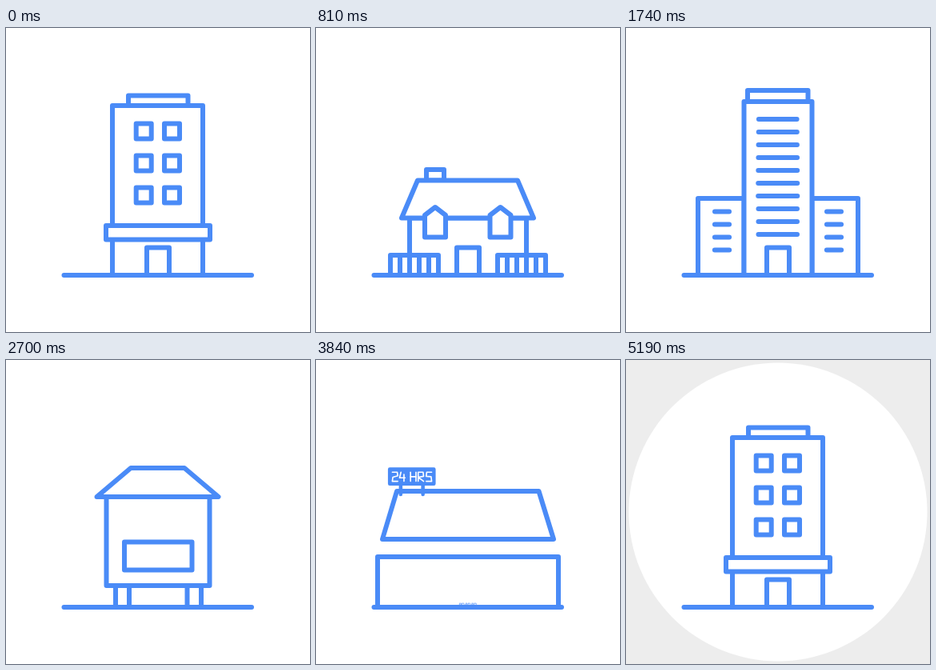
Animation of 380 by 380 pixels, one loop 5.49 s. Source, as an HTML page with a canvas:

```html
<!DOCTYPE html>
<html lang="en">
<head>
<meta charset="utf-8">
<title>Buildings</title>
<style>
  html, body { margin: 0; width: 100%; height: 100%; overflow: hidden; background: #fff; }
  canvas { display: block; width: 100vmin; height: 100vmin; }
</style>
</head>
<body>
<canvas id="stage" width="380" height="380" role="img" aria-label="Buildings changing shape, one with a sign reading 24 HRS"></canvas>
<script>
const ctx = document.getElementById('stage').getContext('2d');
const BLUE = '#4a8bf7', LOOP = 5490, LAST = 5190, STEP = 30;
const MID = 190, GROUND = 309;
const LEFT_RIGHT = [-1, 1];

// ---- timing ----
const clamp = x => Math.max(0, Math.min(1, x));
const ring = (x, period, decay) => Math.exp(-x / decay) * Math.cos(2 * Math.PI * x / period);

function spring(t, start, period, decay) {
  const x = t - start;
  if (x <= 0) return 0;
  return x > 500 ? 1 : 1 - ring(x, period, decay);
}

// Swells a little, then shrinks to nothing.
function leave(t, start, length) {
  const x = clamp((t - start) / length);
  return 1 - x * x * (2.2 * x - 1.2);
}

const frameLife = (t, a, b, decay = 60) => spring(t, a, 400, decay) * leave(t, b, 150);
const detailLife = (t, a, b) => spring(t, a, 360, 120) * leave(t, b, 160);

function bump(t, a, b) {
  return Math.sin(Math.PI * clamp((t - a) / (b - a))) ** 2;
}

// ---- drawing ----
let view;

// Points drawn inside are scaled around (x, y); line weight is kept apart.
function part(x, y, sx, sy, weight, draw) {
  if (sx < 0.03 || sy < 0.03) return;
  view = { x, y, sx, sy };
  ctx.lineWidth = weight;
  draw();
}

const frame = (s, draw, x = MID, y = GROUND) => part(x, y, s, s, 6 * Math.min(1, s * 3), draw);
const detail = (s, x, y, draw) => part(x, y, s, s, 6 * s, draw);

function poly(points, closed) {
  ctx.beginPath();
  for (let i = 0; i < points.length; i += 2) {
    ctx.lineTo(view.x + (points[i] - view.x) * view.sx,
               view.y + (points[i + 1] - view.y) * view.sy);
  }
  if (closed) {
    ctx.closePath();
    ctx.fill();
  }
  ctx.stroke();
}

const line = (...p) => poly(p, false);
const shape = (...p) => poly(p, true);
const box = (l, t, r, b) => shape(l, t, r, t, r, b, l, b);

// ---- buildings ----
function door(t) {
  const s = t < 2700 ? leave(t, 2270, 130) : spring(t, 4920, 360, 120);
  detail(s, MID, GROUND, () => box(176, 274.5, 204, GROUND));
}

function apartments(time) {
  const t = time < 2700 ? time + LOOP : time;
  frame(frameLife(t, 4890, LOOP + 270), () => {
    box(153, 84.5, 227.5, 97);
    box(133, 97, 246, GROUND);
    box(125, 247, 255, 264.5);
  });
  for (let row = 0; row < 3; row++) {
    const y = 119.5 + row * 40;
    const s = detailLife(t, 4920, LOOP + 60 + row * 40);
    for (const x of [162.7, 198]) {
      detail(s, x + 9.5, y + 9.5, () => box(x, y, x + 19, y + 19));
    }
  }
}

function cottage(t) {
  frame(frameLife(t, 510, 960), () => {
    box(117, 237.5, 263, GROUND);
    box(138, 177, 160, 190.5);
    shape(127, 190.5, 252, 190.5, 272, 237.5, 107, 237.5);
  });
  const dormers = detailLife(t, 540, 900);
  for (const x of [149, 230.5]) {
    detail(dormers, x, 243, () =>
      shape(x - 13, 261.5, x - 13, 234, x, 224, x + 13, 234, x + 13, 261.5));
  }
  frame(frameLife(t, 510, 930, 80), () => {
    for (const x of [93, 227]) {
      box(x, 284, x + 60, GROUND);
      for (let i = 1; i < 5; i++) line(x + i * 12, 284, x + i * 12, GROUND);
    }
  });
}

function tower(t) {
  frame(frameLife(t, 1120, 2290, 80), () => {
    box(90, 213, 147.5, GROUND);
    box(232.5, 213, 290, GROUND);
  });
  frame(frameLife(t, 1100, 2330), () => {
    box(152, 78, 227.5, 92);
    box(147.5, 92, 232.5, GROUND);
  });
  for (let i = 0; i < 10; i++) {
    const y = 114 + i * 16;
    detail(detailLife(t, 1320 - i * 12, 2170 + i * 10), MID, y, () => line(165.5, y, 214, y));
  }
  for (let i = 0; i < 4; i++) {
    const y = 229.5 + i * 16;
    for (const side of LEFT_RIGHT) {
      const x = MID + side * 70;
      detail(detailLife(t, 1290 - i * 12, 2150 + i * 10), x, y, () => line(x - 9, y, x + 9, y));
    }
  }
}

function hut(t) {
  const s = frameLife(t, 2400, 3460);
  const squash = bump(t, 3210, 3480);
  const legs = frameLife(t, 2400, 3460);
  frame(legs, () => {
    box(137, 282, 154, GROUND);
    box(226.5, 282, 244, GROUND);
  });
  const base = GROUND - 27 * s;
  const weight = 6 * Math.min(1, s * 3);
  const place = (y, scale = 1) => base + (y - 282) * s * scale;
  const flat = 1 - 0.12 * squash;
  const across = (x, widen) => MID + (x - MID) * s * (1 + widen * squash);
  part(0, 0, s > 0.03 ? 1 : 0, 1, weight, () => {
    box(across(125.5, 0.15), place(171, flat), across(254.5, 0.15), base);
    shape(across(113.5, 0.25), place(171, flat), across(156, 0.25), place(135, flat),
          across(223, 0.25), place(135, flat), across(265.5, 0.25), place(171, flat));
  });
  detail(detailLife(t, 2430, 3400), MID, 245, () => box(148, 227.5, 232.5, 262.5));
}

function rooms(s, floor) {
  detail(s, MID, floor, () => {
    for (let i = 0; i < 3; i++) {
      const x = 89 + i * 73.3;
      box(x, floor - 47, x + 19, floor - 29);
      box(x + 29, floor - 47, x + 53, floor);
    }
  });
}

// Letters on a unit square, one or more strokes each.
const GLYPHS = [
  [93, [0, 0, 0.9, 0, 1, 0.4, 0.1, 0.55, 0, 1, 1, 1]],
  [103, [0.25, 0, 0, 0.62, 1, 0.62], [0.8, 0.25, 0.8, 1]],
  [118, [0, 0, 0, 1], [1, 0, 1, 1], [0, 0.5, 1, 0.5]],
  [128.5, [0, 1, 0, 0, 0.9, 0, 1, 0.45, 0, 0.55, 1, 1]],
  [139.5, [1, 0, 0.1, 0, 0, 0.45, 0.9, 0.5, 1, 1, 0, 1]]
];

function sign(s) {
  if (s < 0.03) return;
  part(119.75, 168, s, s, 5 * s, () => {
    line(104.5, 156, 104.5, 168);
    line(135, 156, 135, 168);
    ctx.fillStyle = BLUE;
    box(89.5, 133.5, 150, 153.5);
    ctx.strokeStyle = '#fff';
    ctx.lineWidth = 1.8 * s;
    for (const [x, ...strokes] of GLYPHS) {
      for (const p of strokes) {
        line(...p.map((v, i) => i % 2 ? 137.5 + v * 12.5 : x + v * 7.5));
      }
    }
  });
  ctx.fillStyle = '#fff';
  ctx.strokeStyle = BLUE;
}

function motel(t) {
  const x = t - 3840;
  const hop = x < 0 ? Math.sin(Math.PI / 2 * clamp(1 + x / 120)) : ring(x, 360, 110);
  const half = 105 + 8 * hop;
  const ceiling = 239 + 7 * hop;
  const air = Math.max(0, hop);
  const floor = ceiling - 22 * air;
  const top = 168.5 - 4.5 * hop;
  frame(frameLife(t, 3540, 4710), () => {
    box(MID - half, ceiling, MID + half, GROUND);
    shape(MID - 105 + 16 * hop, top, MID + 104.5 - 16 * hop, top,
          MID + 105 + 2 * air, floor, MID - 105 - 2 * air, floor);
  });
  rooms(detailLife(t, 3829, 4505), GROUND);
  rooms(detailLife(t, 3900, 4650), 239);
  sign(detailLife(t, 3760, 4660));
}

function backdrop(t) {
  ctx.fillStyle = t >= 5130 ? '#ededed' : '#fff';
  ctx.fillRect(0, 0, 380, 380);
  ctx.fillStyle = '#fff';
  ctx.beginPath();
  ctx.arc(190, 190, 186.5, 0, 2 * Math.PI);
  ctx.fill();
}

function render(t) {
  backdrop(t);
  ctx.strokeStyle = BLUE;
  ctx.lineCap = ctx.lineJoin = 'round';
  for (const draw of [apartments, cottage, tower, hut, motel, door]) draw(t);
  part(0, 0, 1, 1, 6, () => line(72.5, GROUND, 307, GROUND));
}

const begin = performance.now();
function tick() {
  const t = (performance.now() - begin) % LOOP;
  render(Math.min(LAST, Math.floor(t / STEP) * STEP));
  requestAnimationFrame(tick);
}
tick();
</script>
</body>
</html>
```
